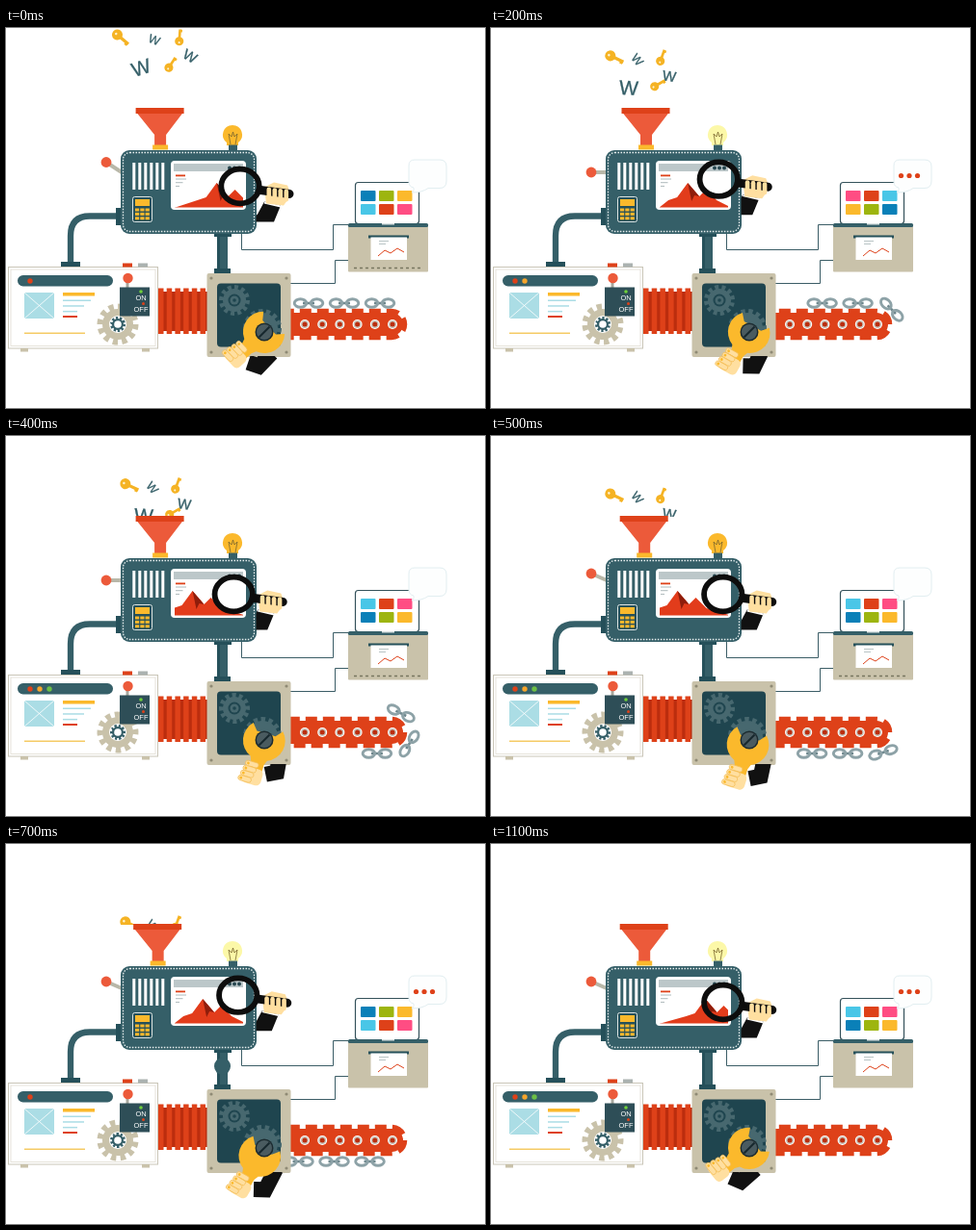
Write an HTML page that moves like this. It is 497 px wide and 395 px high and loops after 1.2 s.

```html
<!DOCTYPE html>
<html lang="en">
<head>
<meta charset="utf-8">
<title>Content machine</title>
<style>
  html, body { margin: 0; width: 100%; height: 100%; overflow: hidden; background: #fff; }
  svg { display: block; width: 497px; height: 395px; }
  text { font-family: "Liberation Sans", Arial, sans-serif; }
  .switch { font: 7.5px "Open Sans", sans-serif; }
</style>
</head>
<body>
<svg id="stage" viewBox="0 0 497 395"></svg>
<script>
const DARK = '#355f68', DEEP = '#25505a', INK = '#1f454f', GEAR = '#47686f', RED = '#de4119', CORAL = '#ec5a3a',
  BRICK = '#bb2d0e', GOLD = '#fbb92c', BEIGE = '#c9c2aa', SKIN = '#ffdfa0', STEEL = '#8da2a7', SKY = '#abdde5',
  BLUE = '#0a80b8', LIME = '#9db50f', CYAN = '#49c6e7', PINK = '#ff4d83';
const stage = document.getElementById('stage');

const times = (n, fn) => Array.from({ length: n }, (_, i) => fn(i)).join('');
const rect = (x, y, w, h, fill, more = '') =>
  `<rect x="${x}" y="${y}" width="${w}" height="${h}" fill="${fill}" ${more}/>`;
const dot = (x, y, r, fill, more = '') => `<circle cx="${x}" cy="${y}" r="${r}" fill="${fill}" ${more}/>`;
const path = (d, fill, more = '') => `<path d="${d}" fill="${fill}" ${more}/>`;
const line = (d, color, w, more = '') => path(d, 'none', `stroke="${color}" stroke-width="${w}" ${more}`);
const group = (id, body) => `<g id="${id}">${body}</g>`;
const clip = (id, body) => `<g clip-path="url(#${id})">${body}</g>`;
const shift = (x, y, body) => `<g transform="translate(${x} ${y})">${body}</g>`;
const clipBox = (id, x, y, w, h) => `<clipPath id="${id}">${rect(x, y, w, h, '#000')}</clipPath>`;

const cog = (r, tooth, n, fill) => dot(0, 0, r, fill) +
  dot(0, 0, r + tooth / 2 - .5, 'none',
    `stroke="${fill}" stroke-width="${tooth + 1}" pathLength="${2 * n}" stroke-dasharray="1.1 .9"`);

const keyShape = size => `<g transform="scale(${size})">` + dot(-4, 0, 4.8, '#f5b324') +
  rect(-1, -1.4, 10, 2.8, '#f5b324') + rect(6, 0, 2.8, 2.6, '#f5b324') + dot(-5.4, 0, 1.1, '#fff3cf') + '</g>';
const letter = size =>
  `<text font-size="${size}" text-anchor="middle" y="${size * .36}" fill="${DARK}" stroke="${DARK}" stroke-width=".3">W</text>`;

// Items swing by drift and spin at first, then fall straight.
const falling = [
  { art: keyShape(1.15), x: 119, y: 10, turn: 40, drift: 9, spin: -15 },
  { art: letter(12.5), x: 154, y: 12, turn: 22, drift: -2, spin: 28 },
  { art: keyShape(.95), x: 180, y: 10, turn: -86, drift: -3, spin: 16 },
  { art: letter(21), x: 140, y: 41, turn: -18, drift: 3, spin: 22 },
  { art: keyShape(.95), x: 171, y: 38, turn: -57, drift: 2, spin: 27 },
  { art: letter(15), x: 191, y: 29, turn: 30, drift: -6, spin: -22 }
];

const funnel = group('funnel',
  path('M135 88H183L165.5 111V123H153.5V111Z', CORAL) + rect(134, 83, 50, 6, RED) + rect(151.5, 121.500, 16, 5, GOLD));

const bulb = path('M235 101a10 10 0 0 1 6 18v3h-12v-3a10 10 0 0 1 6-18Z', GOLD, 'id="glass"') +
  line('M233 121L231 110L234 113L235.5 108L237 113L240 110L238 121', '#79652d', .8) + rect(231, 121.5, 9, 6, DARK);

const calculator = rect(131.5, 175.5, 20, 26, DEEP, 'rx="2" stroke="#dbe4e4" stroke-width="1"') +
  rect(134, 178, 15, 7, GOLD) +
  times(9, i => rect(134 + i % 3 * 5.3, 187.5 + (i / 3 | 0) * 4.4, 4.2, 3, GOLD));

const screen = rect(171, 138, 78, 51, '#fff', 'rx="4"') + rect(174, 141, 72, 8, '#bcc7c9') +
  times(3, i => dot(232 + i * 5, 145.5, 2, '#27464f')) + rect(176, 152.5, 10, 1.8, RED) +
  times(3, i => rect(176, 156.5 + i * 3.7, 11 - i * 3.5, 1, '#adb9bb')) +
  clip('plot', '<path id="peaks" fill="#e23c1b"/><path id="shade" fill="#8f1d0b"/>');

const machine = rect(114, 187, 7, 18, DEEP) + rect(119, 127, 141, 87, DARK, 'rx="9"') +
  rect(121.5, 129.5, 136, 82, 'none', 'rx="7" stroke="#e9f0f0" stroke-width="1.3" stroke-dasharray="1.5 1.5"') +
  times(6, i => rect(131.3 + i * 6, 140, 3, 28, '#fff')) + calculator + screen;

const pipes = line('M119 195.5H87Q67 195.5 67 216V246', DARK, 6.3) + rect(57, 243, 20, 5, DEEP) +
  rect(219, 214, 11, 42, DARK) + rect(219, 214, 3, 42, DEEP) + rect(216, 213, 18, 4, DEEP) + rect(216, 250, 17, 5, DEEP) +
  `<ellipse id="bulge" cx="224.5" rx="8.5" ry="9" fill="${DARK}"/>`;

const wires = line('M244.5 213V230.5H339.5V204.5H356M295 265.5H341.5V241.5H356', '#3b5d66', 1);

const browser = rect(2.5, 248.5, 155, 84.5, '#fff', 'stroke="#c9c5b7" stroke-width="1"') +
  rect(5, 251, 150, 79.5, 'none', 'stroke="#e0ddd2" stroke-width=".8"') +
  rect(15, 333, 8, 3.5, BEIGE) + rect(141, 333, 8, 3.5, BEIGE) + rect(12, 257, 99, 11.5, DARK, 'rx="5.7"') +
  times(3, i => dot(25 + i * 10, 263, 2.7, [RED, '#f6a52b', '#6cbf45'][i], `id="lamp${i}"`)) +
  rect(19, 275, 31, 27, SKY) + line('M19 275L50 302M50 275L19 302', '#fff', .8) + rect(59, 275, 33, 3.5, GOLD) +
  times(3, i => rect(59, 282.5 + i * 5.7, 29 - i * 7, 1.5, SKY)) +
  rect(59, 299, 15, 2, RED) + rect(19, 316.5, 63, 1.5, '#f5cb65') +
  rect(121, 244.5, 10, 4, RED) + rect(137, 244.5, 10, 4, '#abb2b0') +
  shift(116, 308, group('wheel', cog(16, 5.5, 12, BEIGE)) + dot(0, 0, 9, '#fff') +
    group('hub', cog(6, 2, 10, DARK)) + dot(0, 0, 3.8, '#fff')) +
  rect(124.5, 261, 3, 9, '#a7a79e') + dot(126.5, 260, 5.2, CORAL) + rect(118, 269.5, 31, 30, '#2e4e57') +
  dot(140, 274, 1.8, '#6fd03c') + dot(142.5, 286.5, 1.5, RED) +
  '<g class="switch" fill="#fff" text-anchor="middle"><text x="140" y="283">ON</text><text x="140" y="294.8">OFF</text></g>';

const bellows = rect(158, 274, 51, 41, BRICK) + times(6, i => rect(158 + i * 8.7, 270.5, 5.5, 47.5, RED));

const laptop = rect(362.5, 160.5, 66, 43, '#fff', 'rx="3" stroke="#34515a" stroke-width="1.2"') +
  times(6, i => rect(368 + i % 3 * 19, 169 + (i / 3 | 0) * 14, 15.5, 11, RED, `id="tile${i}" rx="1"`)) +
  rect(355, 206, 83, 47.5, BEIGE, 'rx="1"') + rect(355, 203, 83, 4, DARK, 'rx="1.5"') +
  rect(390, 203, 13, 1.5, '#dbe3e3') + rect(376, 215.5, 42, 3, DEEP) + rect(378.5, 217.5, 37.5, 23.5, '#fff') +
  rect(387, 221, 10, 1, '#b9c4c5') + rect(387, 224, 7, 1, '#b9c4c5') +
  line('M386 237L393 231L399 234L406 229L413 233', RED, 1) +
  line('M361 249.5H433', '#77765f', 1.5, 'id="vents" stroke-dasharray="3 3"');

const bubble = path('M424 137H450Q457 137 457 144V159Q457 166.5 450 166.5H438Q432 171 421 171Q424 169 423 166Q418 165 418 160V143Q418 137 424 137Z',
  '#fdfefe', 'stroke="#e2eef1" stroke-width="1"') +
  group('talk', times(3, i => dot(425.5 + i * 8.5, 153.5, 2.6, RED)));

const rivet = dot(0, 0, 5, '#fff') + dot(0, 0, 3.9, '#c7c1b7') + dot(0, 0, 2.5, BRICK);
const tread = rect(290, 296, 111, 24, RED) + dot(400, 308, 12, RED) +
  line('M288 296H400A12 12 0 0 1 400 320H288', RED, 8.5, 'id="teeth" stroke-dasharray="12 6"') +
  times(6, i => shift(310 + i * 18.2, 308, rivet));

const oval = x => `<ellipse cx="${x}" rx="6.3" ry="4.3" fill="none" stroke="${STEEL}" stroke-width="2.9"/>`;
const links = times(3, i => group('link' + i, line('M-6 0H6', '#6e878d', 2.6) + oval(-8.5) + oval(8.5)));

const gearbox = rect(208.5, 255, 87, 87, BEIGE, 'rx="2"') + rect(219, 265.5, 66, 66, INK, 'rx="4"') +
  times(4, i => dot(213 + i % 2 * 78, 260 + (i / 2 | 0) * 77, 1.6, '#8f8a75')) +
  shift(237, 283, group('small', cog(12, 4, 12, GEAR)) + dot(0, 0, 6.5, INK) + dot(0, 0, 4.5, GEAR) + dot(0, 0, 1.8, INK)) +
  shift(266, 312, group('large', cog(16, 4, 14, GEAR)));

const PIVOT = { x: 268, y: 316 };
const wrench = clip('below', '<path id="arm" fill="none" stroke="#111" stroke-width="16"/>') +
  group('wrench', path('M-7 -10L-14 -16A21 21 0 0 1 20 -9L25 -7H46V7H25L20 9A21 21 0 0 1 -14 16L-7 10Z', GOLD) +
    rect(31, -9, 17, 21, SKIN, 'rx="5"') +
    times(4, i => rect(25 + i * 5.6, -2 + i, 5.3, 14, SKIN, 'rx="2.6" stroke="#f4bd55" stroke-width=".7"') +
      dot(27.7 + i * 5.6, 9 + i, 1.4, GOLD))) +
  shift(PIVOT.x, PIVOT.y, dot(0, 0, 9.5, '#1c2b30') + dot(0, 0, 8, '#4a5b60') + line('M-5.5 5.5L5.5 -5.5', '#17282d', 2));

const lens = clip('beside', group('sleeve', path('M25 16L42 20L35 37H10L18 29Z', '#111') + line('M25 17L42 21', '#fff', 2))) +
  group('lens', path('M25 1L35 -4L49 -1L53 9L45 20L27 18Z', SKIN) +
    '<ellipse rx="19.7" ry="17.8" fill="none" stroke="#0d0d0d" stroke-width="5.8"/>' +
    line('M21 4L51 8', '#0d0d0d', 9, 'stroke-linecap="round"') +
    times(4, i => rect(27.5 + i * 6, 1 + i * .7, 4.6, 13, SKIN, 'rx="2.3"')));

const lever = line('', '#b8b7a8', 4, 'id="rod"') + dot(104, 140, 5.4, CORAL, 'id="knob"');

stage.innerHTML = '<defs>' + clipBox('above', 100, 0, 120, 84) + clipBox('plot', 175, 150, 71, 36.5) +
  clipBox('beside', 259.5, 140, 60, 80) + clipBox('below', 200, 341, 120, 50) + clipBox('outside', 295, 270, 150, 80) + '</defs>' +
  clip('above', falling.map((item, i) => group('item' + i, item.art)).join('')) +
  funnel + bulb + lever + wires + pipes + machine + lens + browser + bellows + tread +
  clip('outside', links) + gearbox + laptop + bubble + wrench;

const el = {};
stage.querySelectorAll('[id]').forEach(node => el[node.id] = node);
const set = (id, attrs) => { for (const k in attrs) el[id].setAttribute(k, attrs[k]); };
const place = (id, x, y, turn = 0) => set(id, { transform: `translate(${x} ${y}) rotate(${turn})` });
const show = (id, on) => set(id, { visibility: on ? 'visible' : 'hidden' });
const wave = (step, period, peak = 0) => Math.cos(2 * Math.PI * (step - peak) / period);
const polar = (from, length, degrees) => {
  const a = degrees * Math.PI / 180;
  return { x: from.x + length * Math.cos(a), y: from.y + length * Math.sin(a) };
};

const palette = [BLUE, LIME, GOLD, CYAN, RED, PINK];
const layouts = [palette, [...palette].reverse(), [...palette.slice(3), ...palette.slice(0, 3)]];

function drawItems(step) {
  const swing = Math.min(1, step / 2);
  falling.forEach((f, i) => place('item' + i, f.x + f.drift * swing, f.y + 10.4 * step, f.turn + f.spin * swing));
}

function drawSignals(step) {
  const pair = step >> 1, lit = pair % 2 === 0;
  set('glass', { fill: lit ? GOLD : '#fcf8a8' });
  show('vents', lit);
  show('talk', !lit);
  layouts[pair % 3].forEach((fill, i) => set('tile' + i, { fill }));
  for (let i = 0; i < 3; i++) show('lamp' + i, i <= pair % 3);
}

function drawChart(step) {
  const x = 208 + 15 * wave(step, 12, -1.5);
  set('peaks', { d: `M174 187L${x - 20} 179L${x - 11} 176L${x} 161L${x + 12} 175L${x + 19} 168L${x + 30} 179L250 187Z` });
  set('shade', { d: `M${x} 161L${x + 12} 175L${x + 7} 174L${x + 4} 180Z` });
}

function drawWrench(step) {
  const angle = 124 + 18 * wave(step, 12, -1.5), slide = Math.max(0, 9 * wave(step, 12, 7));
  const head = polar(PIVOT, slide, angle), hand = polar(head, 40, angle);
  const wrist = polar(hand, 13, angle - 118), elbow = polar(hand, 25, angle - 118);
  place('wrench', head.x, head.y, angle);
  set('arm', { d: `M${274 + (143 - angle) / 4} 338L${elbow.x} ${elbow.y}L${wrist.x} ${wrist.y}` });
}

function onTread(s) {
  const R = 22, straight = 105, arc = Math.PI * R;
  if (s < straight) return [295 + s, 308 - R, 0];
  if (s > straight + arc) return [400 - (s - straight - arc), 308 + R, 180];
  const a = (s - straight) / R;
  return [400 + R * Math.sin(a), 308 - R * Math.cos(a), a * 180 / Math.PI];
}

// The chain creeps on and skips one link each time it has moved a link's length.
function drawChain(step) {
  const pitch = 37, travel = step * pitch * .4;
  const tail = 19 + travel + pitch * Math.floor(travel / pitch);
  for (let i = 0; i < 3; i++) place('link' + i, ...onTread(tail + i * pitch));
  set('teeth', { 'stroke-dashoffset': 1.2 - step * 6 });
}

function draw(step) {
  drawItems(step);
  drawSignals(step);
  drawChart(step);
  drawWrench(step);
  drawChain(step);
  place('funnel', -.3 + 1.8 * wave(step, 12, 2), 0);

  const knob = 146.5 - 7 * wave(step, 6);
  set('knob', { cy: knob });
  set('rod', { d: `M104 ${knob}L120 150` });

  const x = 238.5 + 4.5 * wave(step, 6), y = 164.5 - 8.5 * Math.max(0, wave(step, 6, 1.5));
  place('lens', x, y);
  place('sleeve', x, y);

  show('bulge', step >= 6 && step <= 9);
  set('bulge', { cy: 231 + (step - 7) * 8.5 });
  place('wheel', 0, 0, step * 5);
  place('hub', 0, 0, step * 6);
  place('small', 0, 0, step * 5);
  place('large', 0, 0, -step * 30 / 7);
}

const start = performance.now();
let last = -1;
function tick() {
  const step = Math.floor((performance.now() - start) % 1200 / 100);
  if (step !== last) draw(last = step);
  requestAnimationFrame(tick);
}
tick();
</script>
</body>
</html>
```
